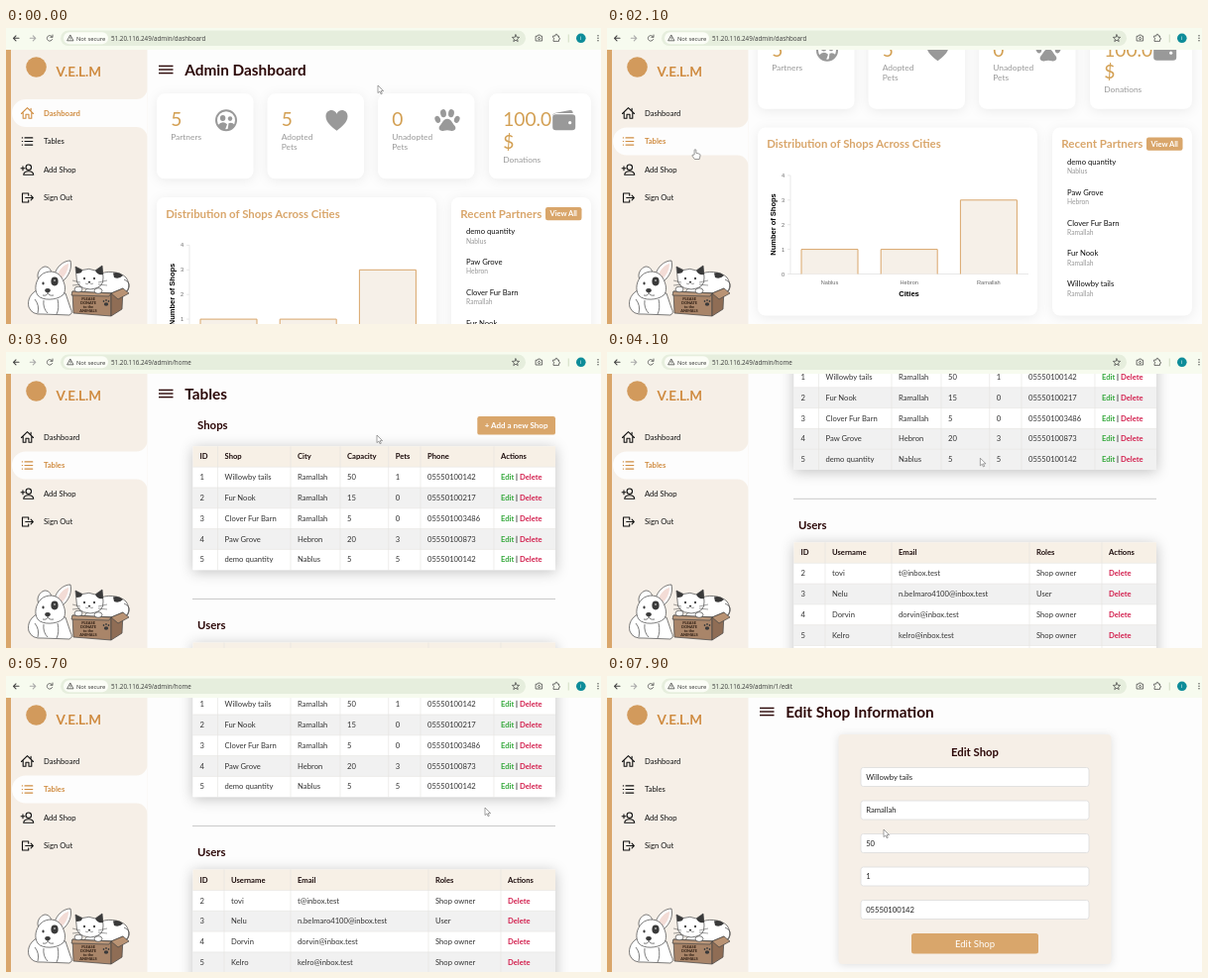
An HTML page that plays this animation: 600 by 299 pixels, repeating every 8 s.

```html
<!DOCTYPE html>
<html lang="en">
<head>
<meta charset="utf-8">
<title>Admin panel</title>
<style>
html, body { margin: 0; width: 100%; height: 100%; overflow: hidden; background: #fdfdfd; }
svg { display: block; width: 600px; height: 299px; }
text { font-family: Lato, sans-serif; white-space: pre; }
.ui { font-family: "Open Sans", "Noto Sans", sans-serif; }
.chart text { font-family: "Liberation Sans", Arial, sans-serif; }
.card { fill: #fff; filter: drop-shadow(0 2px 6px rgba(0,0,0,.07)); }
.sheet { fill: #fff; filter: drop-shadow(0 2px 7px rgba(0,0,0,.24)); }
.line { fill: none; stroke: currentColor; stroke-width: 1.1; stroke-linecap: round; stroke-linejoin: round; }
.thin { stroke-width: .75; }
</style>
</head>
<body>
<svg id="stage" viewBox="0 0 600 299" xmlns="http://www.w3.org/2000/svg"></svg>
<script>
const INK = '#222', MAROON = '#2c0808', TAN = '#d9a66b', GOLD = '#d3a054', BEIGE = '#f6efe7', GRAY = '#999';
const LOOP = 8000, STEP = 100, BAR = 22;

const text = (x, y, size, str, fill = INK, extra = '') =>
  `<text x="${x}" y="${y}" font-size="${size}" fill="${fill}" ${extra}>${str}</text>`;
const bold = (x, y, size, str, fill = INK, extra = '') =>
  text(x, y, size, str, fill, 'font-weight="700" ' + extra);
const rect = (x, y, w, h, fill, extra = '') =>
  `<rect x="${x}" y="${y}" width="${w}" height="${h}" fill="${fill}" ${extra}/>`;
const path = (d, extra = '') => `<path d="${d}" ${extra}/>`;
const line = (d, more = '') => path(d, `class="line ${more}"`);
const oval = (cx, cy, rx, ry, extra = '') =>
  `<ellipse cx="${cx}" cy="${cy}" rx="${rx}" ry="${ry}" ${extra}/>`;
const at = (x, y, body, extra = '') => `<g transform="translate(${x} ${y})" ${extra}>${body}</g>`;
const MID = 'text-anchor="middle"';

const shops = [
  ['1', 'Willowby tails', 'Ramallah', '50', '1', '05550100142'],
  ['2', 'Fur Nook', 'Ramallah', '15', '0', '05550100217'],
  ['3', 'Clover Fur Barn', 'Ramallah', '5', '0', '055501003486'],
  ['4', 'Paw Grove', 'Hebron', '20', '3', '05550100873'],
  ['5', 'demo quantity', 'Nablus', '5', '5', '05550100142']
];
const mail = name => name + '@inbox.test';
const users = [
  ['2', 'tovi', mail('t'), 'Shop owner'],
  ['3', 'Nelu', mail('n.belmaro4100'), 'User'],
  ['4', 'Dorvin', mail('dorvin'), 'Shop owner'],
  ['5', 'Kelro', mail('kelro'), 'Shop owner'],
  ['6', 'Jovi', mail('jovi'), 'Shop owner'],
  ['7', 'Ebi', mail('ebi'), 'User'],
  ['10', 'runo', mail('runo2'), 'User'],
  ['11', 'zeki', mail('z'), 'Shop owner']
];

const menuIcon = () =>
  `<g class="late">${[38.4, 42, 45.6].map(y => rect(154, y - .7, 14.5, 1.4, MAROON)).join('')}</g>`;
const heading = str => menuIcon() + bold(180.2, 47.7, 15.35, str, MAROON);

// Dashboard
const statIcons = [
  `<circle r="10" fill="none" stroke="${GRAY}" stroke-width="2"/>` + oval(-3.4, -2.2, 2.7, 2.9) +
    oval(4, -1.6, 2.2, 2.4) + path('M-8.5 5Q-3.5 -.5 1 4L-1 9.5Q-6 9 -8.5 5ZM1.5 9.5L2.5 3Q6 1.5 8.5 4.5Q6 9 1.5 9.5Z'),
  path('M0 10.5C-5 6.5 -11 2 -11 -4C-11 -11 -2.5 -12.5 0 -6.5C2.5 -12.5 11 -11 11 -4C11 2 5 6.5 0 10.5Z'),
  oval(-4, -7, 2.9, 4.1, 'transform="rotate(-8 -4 -7)"') + oval(4, -7, 2.9, 4.1, 'transform="rotate(8 4 -7)"') +
    oval(-9.8, -.8, 2.7, 3.6, 'transform="rotate(-22 -10 -1)"') + oval(9.8, -.8, 2.7, 3.6, 'transform="rotate(22 10 -1)"') +
    path('M0 -1.5C4 -1.5 5 3 7.5 5.5C10 9 6.5 11.5 3.5 10.5Q0 9.4 -3.5 10.5C-6.5 11.5 -10 9 -7.5 5.5C-5 3 -4 -1.5 0 -1.5Z'),
  path('M-11.5 -4.5Q-11.5 -7 -8.5 -7.5L6 -10.3Q9 -10.5 9 -7.2H-8Q-10.5 -7 -11.5 -4.5Z') +
    rect(-11.5, -6, 23, 16, GRAY, 'rx="3.2"') + '<circle cx="6" cy="2.5" r="1.6" fill="#fff"/>'
];
const stats = [
  [152, 97.5, ['5'], ['Partners'], 222],
  [263.5, 97.5, ['5'], ['Adopted', 'Pets'], 333.5],
  [375, 97.5, ['0'], ['Unadopted', 'Pets'], 445],
  [487, 103, ['100.0', '$'], ['Donations'], 562.7]
];
const statCard = ([x, w, value, label, iconX], i) =>
  rect(x, 66.3, w, 86, '#fff', 'rx="8" class="card"') +
  value.map((s, k) => text(x + 14.2, 99.2 + k * 22.5, 19.2, s, GOLD)).join('') +
  label.map((s, k) => text(x + 14.2, 113.2 + (value.length - 1) * 22.5 + k * 10.2, 8.4, s, GRAY)).join('') +
  at(iconX, 93.2, statIcons[i], `fill="${GRAY}"`);

function chart() {
  const base = 319, unit = 24.9;
  let out = path(`M185 ${base - 4 * unit}V${base}H425`, 'fill="none" stroke="#dedede" stroke-width=".7"');
  for (let n = 0; n < 5; n++) {
    const y = base - n * unit;
    out += path(`M182 ${y}h3`, 'stroke="#dedede" stroke-width=".7"') +
      text(179, y + 2, 5.6, n, '#666', 'text-anchor="end"');
  }
  [['Nablus', 1], ['Hebron', 1], ['Ramallah', 3]].forEach(([city, n], i) => {
    const x = 196 + i * 80.2, y = base - n * unit;
    out += rect(x, y, 57, n * unit, '#f6f0e8') +
      path(`M${x} ${base}V${y}h57V${base}`, `fill="none" stroke="${TAN}" stroke-width="1"`) +
      text(x + 28.5, 329.5, 5.6, city, '#666', MID);
  });
  out += bold(304.5, 341.3, 7.6, 'Cities', '#000', MID) +
    bold(0, 0, 7.5, 'Number of Shops', '#000', MID + ' transform="translate(170 269) rotate(-90)"');
  return `<g class="chart">${out}</g>`;
}

const dashboard = () => heading('Admin Dashboard') + stats.map(statCard).join('') +
  rect(152, 171, 282, 190, '#fff', 'rx="8" class="card"') +
  bold(161.3, 191.6, 11.4, 'Distribution of Shops Across Cities', TAN) + chart() +
  rect(449, 171, 141, 190, '#fff', 'rx="8" class="card"') +
  bold(458.3, 191.6, 11.6, 'Recent Partners', TAN) +
  rect(544, 181, 36.5, 13.2, TAN, 'rx="2.2"') + bold(562.2, 190.3, 7.5, 'View All', '#fff', MID) +
  [...shops].reverse().map((s, i) =>
    text(464, 208.2 + i * 30.9, 7.7, s[1], '#111') + text(464, 217.5 + i * 30.9, 6.7, s[2], GRAY)).join('');

// Tables
const ROW = 20.8;
function table(top, heads, cols, rows, actions) {
  const h = 21 + rows.length * ROW;
  let out = rect(188.5, top, 365.5, h, '#fff', 'class="sheet"') + rect(188.5, top, 365.5, 21, '#f7f0e6');
  rows.forEach((row, i) => {
    const y = top + 21 + i * ROW, base = y + 13;
    out += rect(188.5, y, 365.5, ROW, '#fff', `class="row" data-y="${y}" data-odd="${i % 2}"`);
    out += row.map((s, k) => text(cols[k], base, 7.65, s, '#333')).join('') + actions(cols[row.length], base);
  });
  out += cols.slice(1).map(x => path(`M${x - 7} ${top}V${top + h}`, 'stroke="#e5e2df" stroke-width=".6"')).join('');
  out += rows.map((_, i) => path(`M188.5 ${top + 21 + i * ROW}h365.5`, 'stroke="#e5e2df" stroke-width=".6"')).join('');
  return out + heads.map((s, k) => bold(cols[k], top + 13, 7.65, s, '#1c0c0c')).join('');
}
const del = (x, y) => bold(x, y, 7.65, 'Delete', '#d3214f');
const editDel = (x, y) => bold(x, y, 7.65, 'Edit', '#35a83c') + bold(x + 15, y, 7.65, '|') + del(x + 19, y);

const tables = () => heading('Tables') + bold(193, 78.4, 11.4, 'Shops', MAROON) +
  rect(475.3, 65, 78.7, 18.6, TAN, 'rx="2.2"') + bold(514.6, 77.1, 8, '+ Add a new Shop', '#fff', MID) +
  table(95.2, ['ID', 'Shop', 'City', 'Capacity', 'Pets', 'Phone', 'Actions'],
    [195.5, 220.5, 294, 344, 392.7, 425, 499], shops, editDel) +
  rect(188, 249, 366, .9, '#c4c4c4') + bold(193, 279.8, 11.4, 'Users', MAROON) +
  table(293.5, ['ID', 'Username', 'Email', 'Roles', 'Actions'], [195.5, 227, 294, 433, 506], users, del);

// Edit form
const editForm = () => heading('Edit Shop Information') +
  rect(233.5, 65, 275, 232, BEIGE, 'rx="4" style="filter:drop-shadow(0 1px 4px rgba(0,0,0,.12))"') +
  bold(371, 86.5, 11.3, 'Edit Shop', MAROON, MID) +
  [1, 2, 3, 4, 5].map((k, i) => rect(256, 98.5 + i * 33.5, 230, 19, '#fff', 'rx="2.5" stroke="#dcdcdc" stroke-width=".8"') +
    text(261.2, 110.8 + i * 33.5, 7.65, shops[0][k])).join('') +
  rect(307, 266, 128, 20.6, TAN, 'rx="2.5"') + text(371, 279.8, 9.6, 'Edit Shop', '#fff', MID);

// Sidebar
const navIcons = [
  line('M-4.3 -.5V5.2H-1.5V1.3H1.5V5.2H4.3V-.5M-6 .5L0 -5.3L6 .5M3.6 -4.6V-2.5'),
  line('M-2.5 -3.6H5.3M-2.5 0H5.3M-2.5 3.6H5.3M-5.2 -3.6h.3M-5.2 0h.3M-5.2 3.6h.3'),
  '<circle cx="1.3" cy="-2.3" r="2.7" class="line"/>' + line('M-3.8 5.2C-3.4 .6 6 .6 6.2 5.2ZM-4.5 -3.2V.8M-6.4 -1.2H-2.5'),
  line('M1.2 -2.2V-4.5H-5V4.5H1.2V2.2M-1.8 0H5.8M3.6 -2.3L5.8 0L3.6 2.3')
];
const navItems = ['Dashboard', 'Tables', 'Add Shop', 'Sign Out'];
const navY = i => 86 + i * 28.5;

const pets = () => {
  const dark = 'fill="#3a3a3a" stroke="none"';
  const dog =
    path('M33 264C25 267 21 275 23 282Q26 290 37 289L64 290Q68 288 65 283L60 268Z') +
    path('M33 254C30 249 34 242 39 241C44 241 46 245 46 250Z') +
    path('M49 249C51 241 58 235 65 235C67 243 63 251 57 256Z') +
    path('M52 249C54 243 59 239 63 238C63 244 60 250 56 253Z', 'fill="#f3dcd6" stroke="none"') +
    path('M35 250C41 244 52 245 56 252C60 259 61 266 57 270C51 275 37 276 32 270C28 264 30 255 35 250Z') +
    oval(49, 256, 3.6, 4.4, dark) + oval(37.5, 258, 1.1, 1.4, dark) + oval(42, 265, 2.8, 2, dark) +
    path('M42 267Q42 271 37 270M42 267Q43 271 48 270M38 275Q37 283 42 288M52 274Q54 283 51 289M29 274Q34 280 32 288', 'fill="none"') +
    oval(49, 255, .8, .8, 'fill="#fff" stroke="none"');
  const cat =
    path('M92 250C101 244 115 246 121 252C126 259 124 267 117 268L78 268Z') +
    path('M108 247.5Q114 246 118 250Q114 254 109 252Z', dark) +
    path('M119 254Q127 257 123 265Q119 270 112 266', 'fill="none"') +
    path('M71 251L70 241L77 244.5Q84 242 90 245L97 240L98 252Q99 263 85 264Q70 263 71 251Z') +
    path('M71 248L70 241L77 244.5Q77 248 71 248ZM90 245L97 240L98 249Q92 250 90 245Z', dark) +
    oval(79, 253, 1, 1.3, dark) + oval(89, 253, 1, 1.3, dark) + oval(84, 256.5, 1.2, .8, dark) +
    path('M84 257Q82 260 80 258M84 257Q86 260 88 258M67 255L75 257M67 260L75 259M102 255L93 257M102 260L93 259', 'fill="none" stroke-width=".5"');
  const box =
    path('M67 266L106 268L106 291L68 288Z', 'fill="#a98569"') +
    path('M106 268L118 263L117 284L106 291Z', 'fill="#8f6d55"') +
    path('M106 268L118 263L124 268L113 274Z', 'fill="#b99374"') +
    path('M67 266L106 268L104 271L66 270Z', 'fill="#bd9a7d"') +
    oval(73, 264, 4, 2.8) + oval(93, 265.5, 4, 2.8) + oval(101, 279, 2.2, 1.8, dark) +
    oval(98.5, 276, .8, 1, dark) + oval(101, 275, .8, 1, dark) + oval(103.5, 276, .8, 1, dark);
  const words = ['PLEASE', 'DONATE', 'to the', 'ANIMALS'].map((s, i) =>
    bold(83, 275.2 + i * 3.8, 3.9, s, '#2a1a10', MID)).join('');
  return `<g fill="#fff" stroke="#444" stroke-width=".7" stroke-linejoin="round">${dog}${cat}${box}</g>` + words;
};

const sidebar = () => rect(0, BAR, 5, 277, TAN) + rect(5, BAR, 137.5, 277, BEIGE) +
  path('M142.5 -25A11 11 0 0 1 131.5 -14H20A14 14 0 0 0 20 14H131.5A11 11 0 0 1 142.5 25Z', 'id="pill" fill="#fdfdfd"') +
  '<circle cx="30.5" cy="39.5" r="10.3" fill="#d29a5c" clip-path="url(#art)"/>' +
  bold(50.5, 49.4, 13.5, 'V.E.L.M', '#cf8b40') +
  navItems.map((s, i) => `<g class="nav"><g class="late">${at(21.5, navY(i), navIcons[i])}</g>` +
    text(38, navY(i) + 2.7, 7.65, s, 'currentColor') + '</g>').join('') +
  `<g clip-path="url(#art)">${pets()}</g>`;

// Browser frame
const toolbar = () => rect(0, 0, 600, BAR, '#f7fbef') + rect(55, 2.5, 469, 15.6, '#e6eedd', 'rx="7.8"') +
  rect(58, 4.3, 45, 12, '#fbfdf6', 'rx="6"') +
  '<g color="#444">' + line('M13 10.3H7.5M10 7.8L7.5 10.3L10 12.8') +
  `<g color="#aaa">${line('M24.3 10.3H29.8M27.3 7.8L29.8 10.3L27.3 12.8')}</g>` +
  `<g id="reload">${line('M46.6 9A2.8 2.8 0 1 0 46.7 11.5M47 7V9.3H44.8', 'thin')}</g>` +
  `<g id="stop">${line('M42 8L46.6 12.6M46.6 8L42 12.6')}</g>` +
  line('M65 7.3L68 12.8H62ZM65 9.2V11', 'thin') +
  line('M514 6.8L515 9.2L517.6 9.4L515.6 11.1L516.2 13.6L514 12.2L511.8 13.6L512.4 11.1L510.4 9.4L513 9.2Z', 'thin') +
  line('M534.5 8.2H536L536.6 7H538.6L539.2 8.2H540.6V13H534.5ZM537.6 9.3a1.2 1.2 0 1 0 .01 0', 'thin') +
  line('M552 8H554V7.2A1 1 0 0 1 556 7.2V8H557.5V9.8A1 1 0 0 1 557.5 11.8V13.4H552V11.6A1 1 0 0 0 552 9.7Z', 'thin') + '</g>' +
  rect(566.8, 6.5, .8, 8, '#c9d4b8') + '<circle cx="579.8" cy="10.3" r="4.8" fill="#0d8c99"/>' +
  text(579.8, 12.2, 5.5, 'i', '#fff', MID + ' class="ui"') +
  [7.8, 10.3, 12.8].map(y => `<circle cx="597" cy="${y}" r=".7" fill="#444"/>`).join('') +
  text(71, 12.5, 5.8, 'Not secure', '#333', 'class="ui"') + text(106, 12.6, 6.25, '', '#3a3a3a', 'class="ui" id="url"');

const status = () => `<g id="status">${rect(-2, 289, 77, 12, '#e6ebda', 'rx="2" stroke="#cbd2bd" stroke-width=".6"')}` +
  text(2, 296.3, 5.4, '', '#555', 'class="ui" id="hint"') + '</g>';

const pointer = () =>
  path('M0 0V7.6L1.9 6L3.1 8.7L4.3 8.2L3.1 5.6H5.6Z', 'id="arrow" fill="#fff" stroke="#666" stroke-width=".6"') +
  path('M-.9 5V.2Q0 -1 .9 .2V3.3L4.4 4.2Q5.2 4.6 5 6L4.2 9.5H-.6L-3 6.2Q-3.2 4.6 -1.8 5.2Z', 'id="hand" fill="#fff" stroke="#555" stroke-width=".6"');

const stage = document.getElementById('stage');
stage.innerHTML = `<defs><clipPath id="art">${rect(0, 29, 143, 2.2, '#000')}${rect(0, 233, 143, 10.2, '#000')}</clipPath></defs>` +
  rect(0, 0, 600, 299, '#fdfdfd') +
  [dashboard, tables, editForm].map(page => `<g class="page">${page()}</g>`).join('') +
  sidebar() + status() + toolbar() + `<g id="pointer">${pointer()}</g>`;

const $ = id => document.getElementById(id);
const all = sel => [...stage.querySelectorAll(sel)];
const pages = all('.page'), navs = all('.nav'), late = all('.late'), rows = all('.row');
const clipped = all('[clip-path]');
const show = (node, on) => node.setAttribute('display', on ? 'inline' : 'none');

// Timing tables: [ms, values...]
const pathTrack = [[0, 375, 58], [1100, 375, 60], [1400, 300, 82], [1850, 89, 123], [2700, 89, 123], [3400, 374, 84],
  [3800, 374, 84], [4500, 380, 143], [5100, 380, 143], [5700, 483, 133], [6400, 506, 78], [7300, 506, 78], [7800, 279, 155]];
const scrollTracks = [
  [[200, 0], [1100, 70.5]],
  [[3650, 0], [4500, 186], [5000, 186], [5650, 98], [5750, 98], [6250, 44]],
  [[7400, 0], [7600, 6]]
];
const urls = ['dashboard', 'home', '1/edit'].map(s => '51.20.116.249/admin/' + s);
const within = (t, ...spans) => spans.some(([a, b]) => t >= a && t < b);

function sample(track, t) {
  const next = track.findIndex(k => k[0] > t);
  if (next === 0) return track[0].slice(1);
  if (next < 0) return track[track.length - 1].slice(1);
  const a = track[next - 1], b = track[next];
  const p = (t - a[0]) / (b[0] - a[0]), e = p * p * (3 - 2 * p);
  return a.slice(1).map((v, i) => v + (b[i + 1] - v) * e);
}

function draw(t) {
  const page = t < 2600 ? 0 : t < 6800 ? 1 : 2;
  const loading = within(t, [2600, 2900], [6800, 7350]);
  const active = page === 2 ? -1 : t < 1800 ? 0 : 1;
  const [x, y] = sample(pathTrack, t);
  const [scroll] = sample(scrollTracks[page], t);

  pages.forEach((g, i) => show(g, i === page));
  pages[page].setAttribute('transform', `translate(0 ${-scroll})`);
  rows.forEach(r => {
    const top = r.dataset.y - scroll;
    const hover = x > 188 && x < 554 && y >= top && y < top + ROW;
    r.setAttribute('fill', hover || r.dataset.odd === '1' ? '#f1f1f1' : '#fff');
  });

  show($('pill'), active >= 0);
  $('pill').setAttribute('transform', `translate(0 ${navY(Math.max(active, 0))})`);
  navs.forEach((n, i) => {
    n.setAttribute('color', i === active ? '#d08d42' : '#111');
    n.setAttribute('font-weight', i === active ? 700 : 400);
  });
  late.forEach(n => show(n, !loading));
  clipped.forEach(n => n.setAttribute('clip-path', loading ? 'url(#art)' : 'none'));

  const busy = within(t, [2400, 2900], [6600, 7350]);
  show($('stop'), busy);
  show($('reload'), !busy);
  $('url').textContent = urls[page];
  show($('status'), within(t, [2200, 2950], [6450, 7350]));
  $('hint').textContent = t < 4000 ? urls[1] : urls[2];

  const hand = within(t, [1700, 2800], [6300, 7400]);
  show($('hand'), hand);
  show($('arrow'), !hand);
  $('pointer').setAttribute('transform', `translate(${x} ${y})`);
}

const start = performance.now();
function tick() {
  const t = (performance.now() - start) % LOOP;
  draw(Math.floor(t / STEP) * STEP);
  requestAnimationFrame(tick);
}
tick();
</script>
</body>
</html>
```
